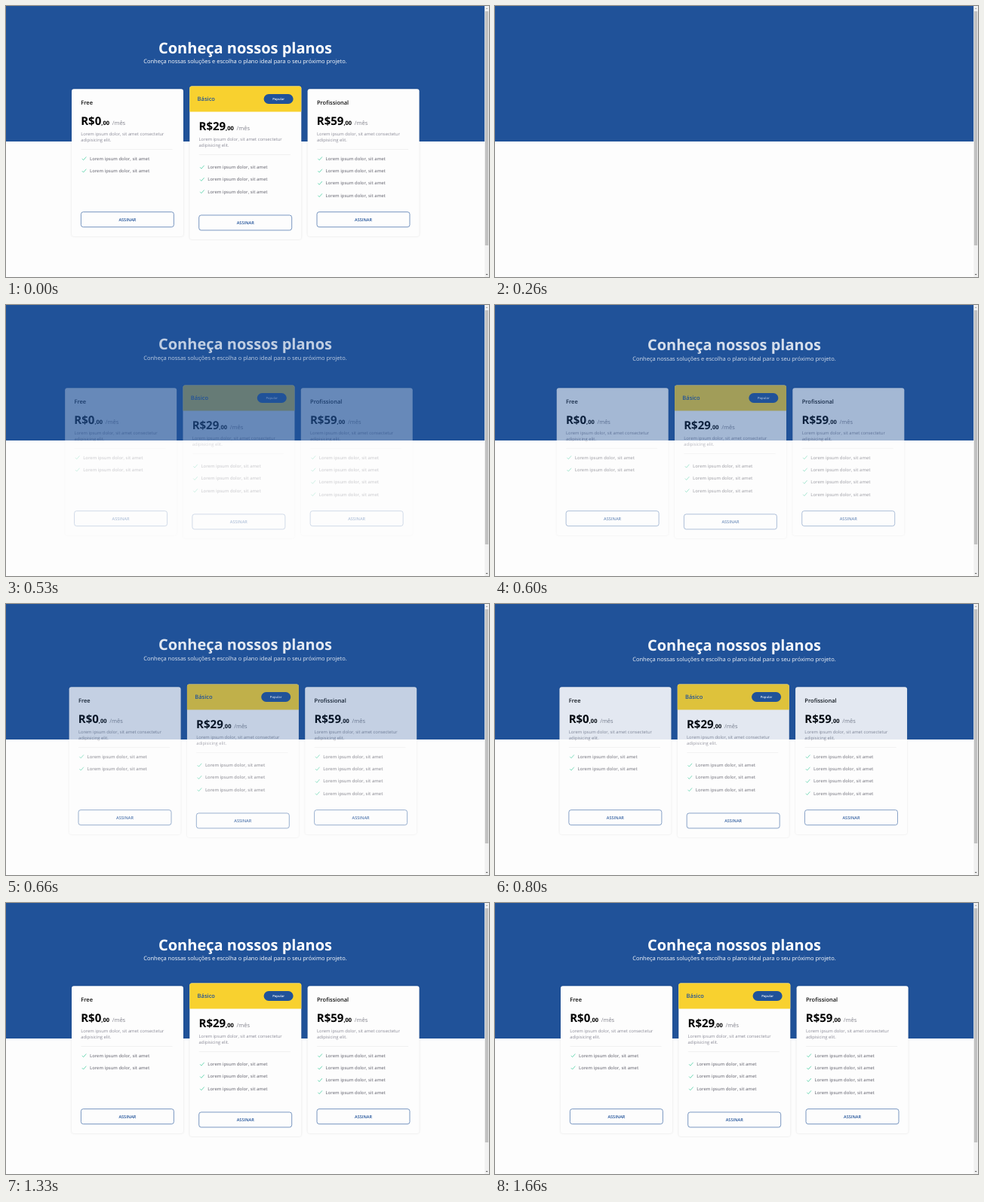
Recreate the animation shown at these times as an HTML page. Size 640 px wide and 360 px high, loop 2.33 s.

```html
<!DOCTYPE html>
<html lang="pt-BR">
<head>
<meta charset="utf-8">
<style>
  html, body { margin: 0; width: 100%; height: 100%; overflow: hidden; background: #fdfdfd; }
  svg { display: block; width: 640px; height: 360px; font-family: "Open Sans", "Noto Sans", sans-serif; text-rendering: geometricPrecision; }
  .title { font: 700 20px "Open Sans", "Noto Sans", sans-serif; }
  .mid { text-anchor: middle; }
  .sub { font-size: 7.5px; }
  .name { font-size: 7.5px; font-weight: 600; }
  .price { font-size: 15px; font-weight: 700; }
  .cents { font-size: 7.5px; }
  .month { font-size: 7.5px; font-weight: 400; fill: #85858f; }
  .desc { font-size: 5.83px; fill: #8b8b98; }
  .item { font-size: 5.83px; font-weight: 600; fill: #81818a; }
  .sign { font-size: 5.56px; font-weight: 600; fill: #205299; }
  .badge { font-size: 4.17px; font-weight: 600; fill: #fff; }
  .box { fill: #fdfdfd; filter: drop-shadow(0 0 1px rgba(0, 0, 0, .12)); }
</style>
</head>
<body>
<svg viewBox="0 0 640 360">
  <rect width="640" height="360" fill="#fdfdfd"/>
  <rect width="634.5" height="180" fill="#205299"/>
  <g id="heading" class="mid" fill="#fff">
    <text class="title" x="317" y="62.5">Conheça nossos planos</text>
    <text class="sub" x="317" y="76.4">Conheça nossas soluções e escolha o plano ideal para o seu próximo projeto.</text>
  </g>
  <g id="cards"></g>
  <rect x="634.3" width="5.7" height="360" fill="#f1f1f1"/>
  <rect x="634.8" y="7" width="4.4" height="311" fill="#c1c1c1"/>
  <path d="M635.6 4l1.5-1.6 1.5 1.6z" fill="#a3a3a3"/>
  <path d="M635.6 356l1.5 1.6 1.5-1.6z" fill="#505050"/>
</svg>
<script>
const LOOP = 2330, STEP = 200 / 3, DURATION = 1000, DISTANCE = 13;
const heading = document.getElementById("heading");
const cards = document.getElementById("cards");

const item = y => `
  <path d="M13.8 ${y - 1.9}l1.8 1.9 3.7-4.3" fill="none" stroke="#4fd1a5" stroke-width=".8"/>
  <text class="item" x="24" y="${y}">Lorem ipsum dolor, sit amet</text>`;

function card(x, name, price, items, popular) {
  const shift = popular ? 7 : 0;
  const top = popular ? 106.5 : 110.3;
  const button = popular ? 277.9 : 273.6;
  const firstItem = popular ? 216.1 : 204.7;
  const header = popular ? `
    <path d="M0 140.5V109.5a3 3 0 0 1 3-3H145a3 3 0 0 1 3 3V140.5z" fill="#f8d12f"/>
    <rect x="98.3" y="117" width="39" height="13" rx="6.5" fill="#205299"/>
    <text class="badge mid" x="117.8" y="125">Popular</text>` : "";
  return `<g transform="translate(${x})">
    <rect class="box" y="${top}" width="148" height="${popular ? 203.5 : 195.7}" rx="3"/>${header}
    <text class="name" x="${popular ? 10.3 : 12.3}" y="${popular ? 126 : 130.7}" fill="${popular ? "#205299" : "#111"}">${name}</text>
    <text class="price" x="12.2" y="${157.8 + shift}">R$${price}<tspan class="cents">,00</tspan><tspan class="month" dx="3.7">/mês</tspan></text>
    <text class="desc" x="12.3" y="${172.3 + shift}">Lorem ipsum dolor, sit amet consectetur</text>
    <text class="desc" x="12.3" y="${180.2 + shift}">adipisicing elit.</text>
    <rect x="12.5" y="${190.4 + shift}" width="121" height=".5" fill="#e4e4e4"/>
    ${Array.from({ length: items }, (_, i) => item(firstItem + i * 16.3)).join("")}
    <rect x="12.4" y="${button}" width="123" height="20" rx="3" fill="none" stroke="#205299" stroke-width=".6"/>
    <text class="sign mid" x="73.9" y="${button + 12}">ASSINAR</text>
  </g>`;
}

cards.innerHTML =
  card(87, "Free", 0, 2) +
  card(243.3, "Básico", 29, 3, true) +
  card(399.6, "Profissional", 59, 4);

// cubic-bezier(.5, 0, 0, 1)
function ease(x) {
  if (x <= 0 || x >= 1) return x <= 0 ? 0 : 1;
  let low = 0, high = 1, u;
  for (let i = 0; i < 24; i++) {
    u = (low + high) / 2;
    if (1.5 * u * (1 - u) ** 2 + u ** 3 < x) low = u; else high = u;
  }
  return u * u * (3 - 2 * u);
}

function reveal(t, start) {
  if (t < 50) return 1;
  return t < 395 ? 0 : ease((t - start) / DURATION);
}

function place(node, shown, dx, dy) {
  const rest = DISTANCE * (1 - shown);
  node.setAttribute("opacity", shown);
  node.setAttribute("transform", `translate(${dx * rest} ${dy * rest})`);
}

function draw() {
  // The page repaints at 15 steps per second
  const t = Math.floor((performance.now() % LOOP + 7) / STEP) * STEP;
  place(heading, reveal(t, 140), 0, -1);
  place(cards, reveal(t, 260), -1, 0);
  requestAnimationFrame(draw);
}
draw();
</script>
</body>
</html>
```
